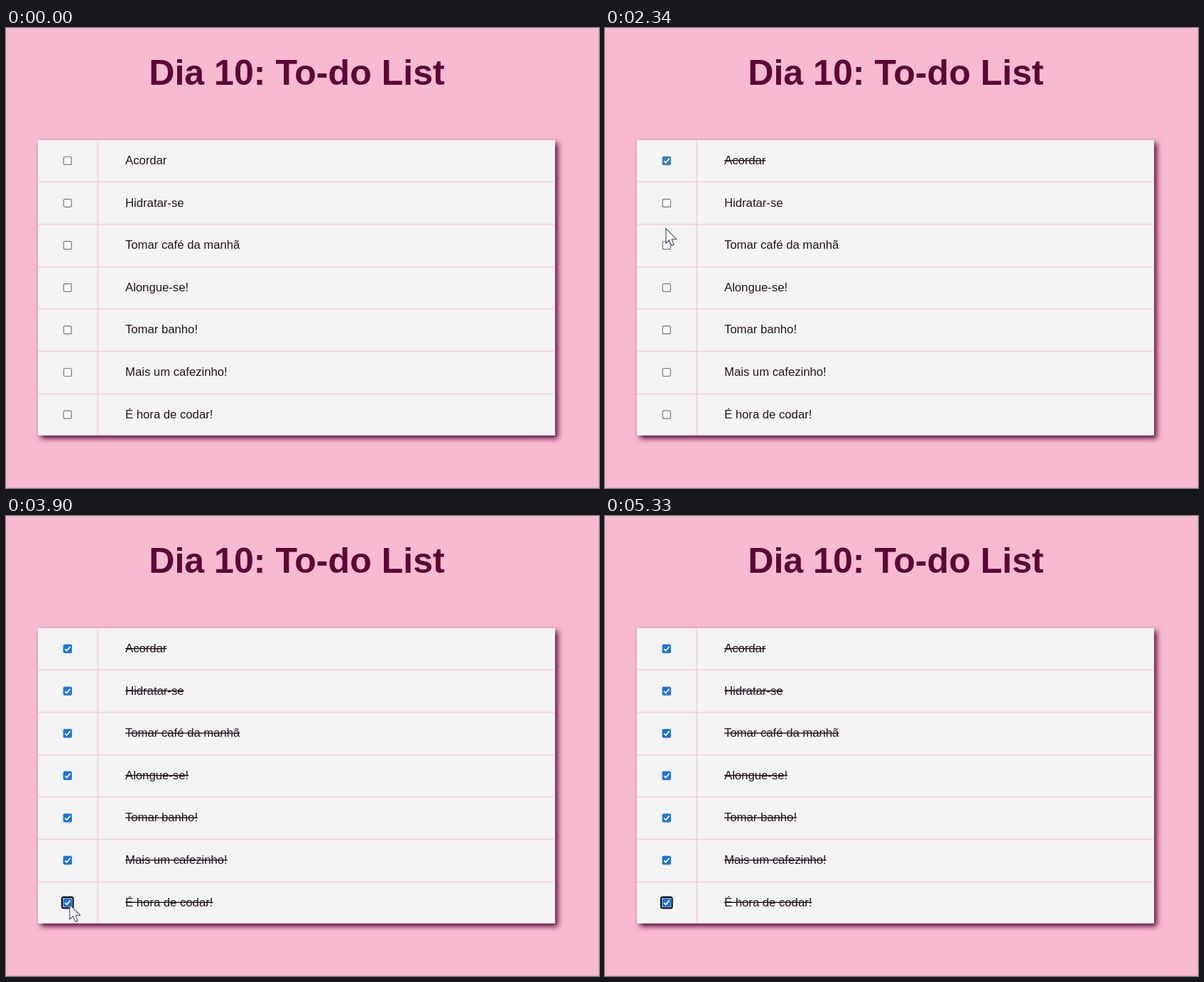
Recreate the animation shown at these times as an HTML page with a canvas. Size 835 by 648 pixels, loop 5590 ms.

```html
<!DOCTYPE html>
<html lang="pt-BR">
<head>
<meta charset="utf-8">
<title>To-do List</title>
<style>
html, body { margin: 0; width: 100%; height: 100%; overflow: hidden; background: #f8bad0; }
canvas { display: block; }
</style>
</head>
<body>
<canvas id="stage" width="835" height="648"></canvas>
<script>
const ctx = document.getElementById('stage').getContext('2d');
const LOOP = 5590, STEP = 130;
// Each click is a press followed by a release one step later
const PRESS_FIRST = 1820, SHIFT_DOWN = 3120, PRESS_LAST = 3380;
const FONT = '"Liberation Sans", Arial, sans-serif';
const card = { x: 45, y: 158, w: 728.2, h: 416 };
const ROW = 59.6, BOX_X = 86.7, BOX_Y = 187;
const items = ['Acordar', 'Hidratar-se', 'Tomar café da manhã', 'Alongue-se!',
  'Tomar banho!', 'Mais um cafezinho!', 'É hora de codar!'];
const LAST = items.length - 1;

const easeInOut = u => u * u * (3 - 2 * u);
const easeOut = u => u * (2 - u);
const easeIn = u => u * u;

// Pointer keys: time, x, y, easing towards the key
const path = [
  [130, 116, 640], [650, 94, 225.5, easeOut], [1040, 83.7, 192.5, easeOut],
  [2080, 83.7, 192.5, easeInOut], [2860, 91.8, 539.5, easeInOut],
  [3120, 89.8, 547.5, easeInOut], [3900, 89.8, 547.5, easeInOut],
  [4810, 99, 655, easeIn]
];
const arrow = [[0, 0], [0, 20.5], [4.6, 16.4], [8, 24], [11.2, 22.6], [8.2, 15.4], [14.6, 15]];

function pointerAt(t) {
  const i = path.findIndex(k => k[0] > t);
  if (i < 1) return null;
  const [t0, x0, y0] = path[i - 1], [t1, x1, y1, ease] = path[i];
  const e = ease((t - t0) / (t1 - t0));
  return [x0 + (x1 - x0) * e, y0 + (y1 - y0) * e];
}

function roundBox(cx, cy, size, r) {
  ctx.beginPath();
  ctx.roundRect(cx - size / 2, cy - size / 2, size, size, r);
}

function stroke(color, width) {
  ctx.strokeStyle = color;
  ctx.lineWidth = width;
  ctx.stroke();
}

function drawCard() {
  const { x, y, w, h } = card;
  ctx.save();
  ctx.shadowColor = '#5b0735';
  ctx.shadowOffsetX = ctx.shadowOffsetY = 4.2;
  ctx.shadowBlur = 7.3;
  ctx.fillStyle = '#f4f4f4';
  ctx.fillRect(x, y, w, h);
  ctx.restore();
  ctx.fillStyle = '#f4d1dd';
  for (let i = 1; i <= LAST; i++) {
    ctx.fillRect(x, Math.round(156.6 + 59.7 * i) - 0.3, w, 1.7);
  }
  ctx.fillRect(128.4, y, 1.8, h);
}

function drawBox(cy, checked, border, ring, color) {
  if (ring) {
    roundBox(BOX_X, cy, 15.6, 2.5);
    stroke('#101010', 2.2);
  }
  roundBox(BOX_X, cy, checked ? 12.4 : 11, 2);
  if (!checked) {
    ctx.fillStyle = '#fff';
    ctx.fill();
    stroke(border, 1.2);
    return;
  }
  ctx.fillStyle = color;
  ctx.fill();
  ctx.beginPath();
  ctx.moveTo(BOX_X - 3.6, cy + 0.3);
  ctx.lineTo(BOX_X - 1.2, cy + 2.8);
  ctx.lineTo(BOX_X + 3.8, cy - 3);
  stroke('#fff', 1.8);
}

function drawItem(text, y, struck) {
  ctx.font = '16.7px ' + FONT;
  ctx.fillStyle = '#22161f';
  ctx.fillText(text, 168, y);
  if (struck) ctx.fillRect(168, y - 6, ctx.measureText(text).width, 1.4);
}

function drawPointer([x, y]) {
  ctx.beginPath();
  for (const [dx, dy] of arrow) ctx.lineTo(x + dx, y + dy);
  ctx.closePath();
  ctx.fillStyle = '#fff';
  ctx.fill();
  stroke('#4b475c', 1.1);
}

function draw(t) {
  ctx.fillStyle = '#f8bad0';
  ctx.fillRect(0, 0, 835, 648);
  ctx.fillStyle = '#e3adc1';
  ctx.fillRect(834, 0, 1, 648);
  ctx.fillRect(0, 647, 835, 1);

  ctx.font = 'bold 50.1px ' + FONT;
  ctx.fillStyle = '#5b0735';
  ctx.fillText('Dia 10: To-do List', 201.2, 80);

  drawCard();
  const pointer = pointerAt(t), all = t >= PRESS_LAST + STEP;
  const focus = t >= PRESS_LAST ? LAST : t >= SHIFT_DOWN ? 0 : -1;
  const pressed = t === PRESS_FIRST || t === PRESS_LAST;
  items.forEach((text, i) => {
    const cy = BOX_Y + ROW * i;
    const checked = all || (i === 0 && t >= PRESS_FIRST + STEP);
    const hover = pointer && Math.hypot(pointer[0] - BOX_X, pointer[1] - cy) < 8;
    const border = !hover ? '#77737c' : pressed ? '#97849f' : '#3c3c3c';
    drawBox(cy, checked, border, i === focus, all ? '#1a75e2' : '#3880c4');
    drawItem(text, 192 + ROW * i, checked);
  });
  if (pointer) drawPointer(pointer);
}

const start = performance.now();
function tick() {
  const t = (performance.now() - start) % LOOP;
  draw(Math.floor(t / STEP) * STEP);
  requestAnimationFrame(tick);
}
tick();
</script>
</body>
</html>
```
